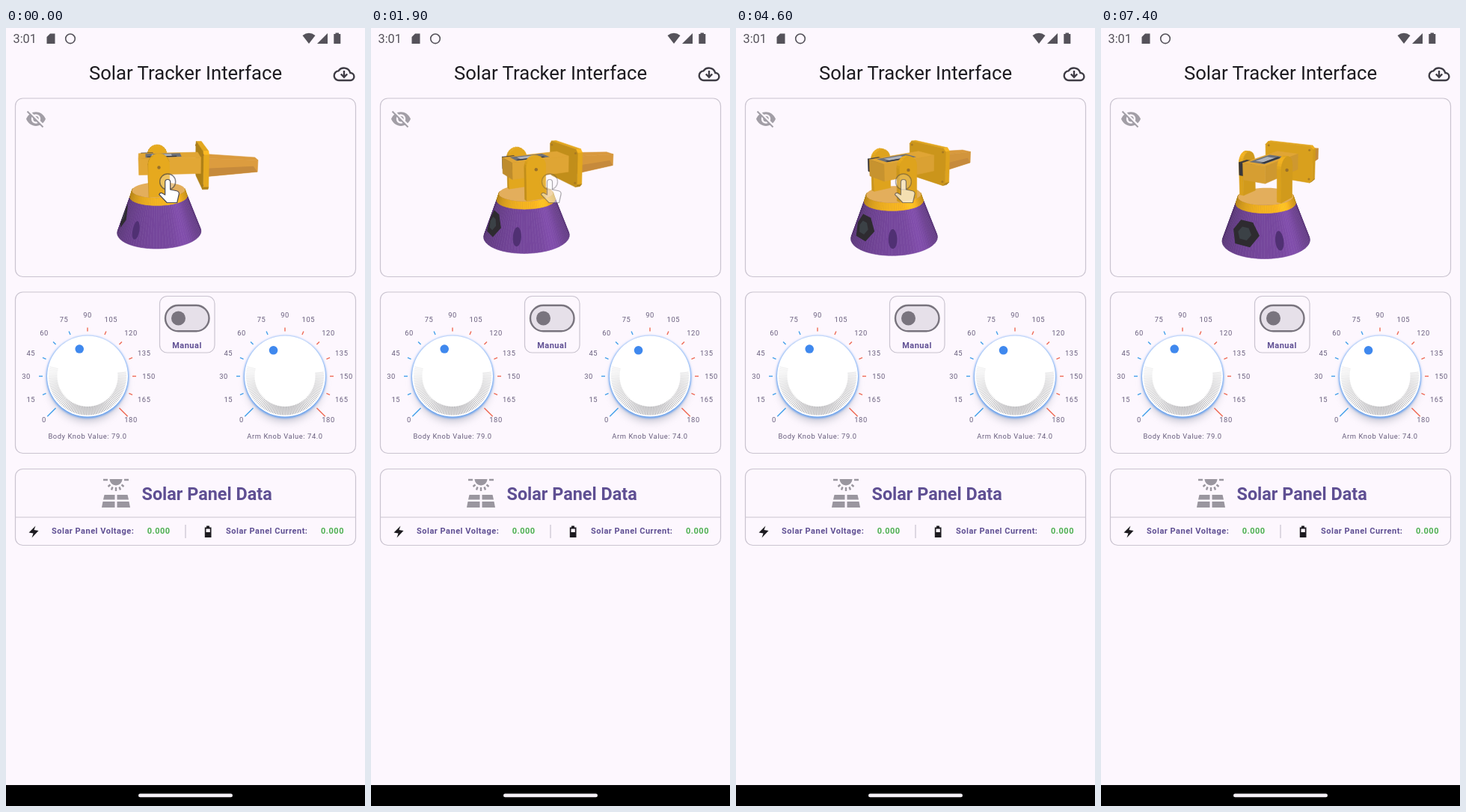
An HTML page with a canvas for the animation above (7500 ms loop, 480 px wide and 1040 px high).

```html
<!DOCTYPE html>
<html lang="en">
<head>
<meta charset="utf-8">
<title>Solar Tracker Interface</title>
<style>
html, body { margin: 0; width: 100%; height: 100%; overflow: hidden; background: #fdf7fe; }
svg, canvas { position: absolute; left: 0; top: 0; width: 480px; height: 1040px; display: block; }
text { font-family: Roboto, sans-serif; fill: #675d7c; }
.card { fill: none; stroke: #cac4d0; stroke-width: 1.2; }
.bold { font-weight: 700; fill: #5f4f93; }
.row { font-size: 11px; letter-spacing: .5px; }
.small { font-size: 9.4px; letter-spacing: .57px; }
.green { fill: #4caf50; }
.status { fill: #55525a; }
.title { fill: #1d1b20; }
</style>
</head>
<body>
<svg viewBox="0 0 480 1040">
  <defs>
    <filter id="rim" x="-30%" y="-30%" width="160%" height="160%"><feGaussianBlur stdDeviation="1.5"/></filter>
    <filter id="drop" x="-40%" y="-40%" width="180%" height="180%"><feGaussianBlur stdDeviation="6"/></filter>
  </defs>

  <g class="status">
    <text class="status" x="9.5" y="20" font-size="16.3">3:01</text>
    <path d="M59 7.500H65.500V21H54.500V12Z"/>
    <circle cx="86" cy="14.300" r="6.300" fill="none" stroke="#55525a" stroke-width="1.600"/>
    <path d="M405 21L396.500 10Q405 3.500 413.500 10Z"/>
    <path d="M430 7V21H416Z"/>
    <path d="M440.500 8V6.500H445V8H447.300V21H438.300V8Z"/>
  </g>

  <text class="title" x="240" y="69" font-size="25.700" text-anchor="middle">Solar Tracker Interface</text>
  <g fill="none" stroke="#3f3c45" stroke-width="2.400">
    <path d="M445.500 70A6.300 6.300 0 0 1 444.500 57.400A8.800 8.800 0 0 1 460.300 60A5 5 0 0 1 460.500 70Z"/>
    <path d="M452 57V65M447.800 61.500L452 65.800L456.200 61.500"/>
  </g>

  <rect class="card" x="12.500" y="94" width="455" height="238.500" rx="10"/>
  <rect class="card" x="12.500" y="353" width="455" height="215.500" rx="10"/>
  <rect class="card" x="12.500" y="589.500" width="455" height="102" rx="10"/>
  <path class="card" d="M12.500 654H467.500M240 664V682"/>

  <g fill="#a29ea6">
    <path fill-rule="evenodd" d="M27 121.500C32 109 48 109 53 121.500C48 134 32 134 27 121.500ZM33.800 121.500a6.200 6.200 0 0 0 12.400 0a6.200 6.200 0 0 0 -12.400 0Z"/>
    <circle cx="40" cy="121.500" r="3.700"/>
    <path d="M30 110.500L51.500 131.500" stroke="#fdf7fe" stroke-width="2.500"/>
    <path d="M28.500 111.500L49.500 132.500" stroke="#a29ea6" stroke-width="2"/>
  </g>

  <g id="knobs"></g>

  <rect x="205.500" y="358.500" width="73.500" height="75.500" rx="10" class="card"/>
  <rect x="213" y="370.700" width="58.500" height="34.600" rx="17.300" fill="#e6e0e9" stroke="#79747e" stroke-width="2.400"/>
  <circle cx="230.500" cy="388" r="9.500" fill="#79747e"/>
  <text class="bold" x="242" y="427.500" font-size="11" letter-spacing=".5" text-anchor="middle">Manual</text>

  <g fill="#9a969f" stroke="#9a969f">
    <path d="M138.500 603H155.500A8.500 8.500 0 0 1 138.500 603Z" stroke="none"/>
    <path d="M130 604H136M158 604H164M136.500 613L139.500 610.500M157.500 613L154.500 610.500M147 614V619M141 617.500L142.500 613.500M153 617.500L151.500 613.500" stroke-width="2.400"/>
    <path d="M131.500 624H145.500V630.500H130ZM148.500 624H162.500L164 630.500H148.500ZM129.500 633H145.500V641H128ZM148.500 633H164.500L166 641H148.500Z" stroke="none"/>
  </g>
  <text class="bold" x="181.500" y="630.500" font-size="23.400">Solar Panel Data</text>

  <path d="M39.500 665.500L30.500 674.500L36.500 675.500L34.500 681.500L43.500 672L37.500 671Z" fill="#1d1b20"/>
  <path fill-rule="evenodd" d="M268 667.500V665.500H272V667.500H274.500V681H265.800V667.500ZM267.500 669.500V674H272.800V669.500Z" fill="#1d1b20"/>
  <g class="row">
    <text class="bold" x="61" y="676">Solar Panel Voltage:</text>
    <text class="bold green" x="188.700" y="676">0.000</text>
    <text class="bold" x="294" y="676">Solar Panel Current:</text>
    <text class="bold green" x="421" y="676">0.000</text>
  </g>

  <rect y="1012" width="480" height="28" fill="#000"/>
  <rect x="177" y="1023.500" width="126" height="4.800" rx="2.400" fill="#f5f0f6"/>
</svg>
<canvas id="stage"></canvas>

<script>
const LOOP = 7500;
const RAD = Math.PI / 180;

// ---- knobs ----
function knob(cx, cy, value, label) {
  const at = (deg, r) => [cx + r * Math.sin(deg * RAD), cy - r * Math.cos(deg * RAD)];
  const line = (deg, r0, r1, attrs) => {
    const [x1, y1] = at(deg, r0), [x2, y2] = at(deg, r1);
    return `<line x1="${x1}" y1="${y1}" x2="${x2}" y2="${y2}" ${attrs}/>`;
  };
  let out = `<circle cx="${cx}" cy="${cy + 10}" r="50" fill="#868a9c" opacity=".5" filter="url(#drop)"/>
    <circle cx="${cx}" cy="${cy + 1}" r="55" fill="#5a9bf2" filter="url(#rim)"/>
    <circle cx="${cx}" cy="${cy}" r="54" fill="#fff"/>`;
  for (let deg = 84; deg <= 284; deg += 2.5) {
    const fade = 0.15 + 0.65 * Math.max(0, Math.sin((deg - 76) * 0.9 * RAD));
    out += line(deg, 40.5, 52, `stroke="#77747a" stroke-width=".9" opacity="${fade}"`);
  }
  for (let i = 0; i <= 12; i++) {
    const deg = -135 + 22.5 * i, long = i % 12 === 0;
    out += line(deg, 60, long ? 76 : 65, `stroke="${i < 6 ? '#42a0ea' : '#ee6a55'}" stroke-width="1.4"`);
    const [x, y] = at(deg, 82);
    out += `<text class="small" x="${x}" y="${y + 3.4}" text-anchor="middle">${i * 15}</text>`;
  }
  const [dx, dy] = at((value - 90) * 1.5, 38);
  return out + `<circle cx="${dx}" cy="${dy}" r="5.8" fill="#3f88ee"/>
    <text class="small" x="${cx}" y="549" text-anchor="middle">${label} Knob Value: ${value.toFixed(1)}</text>`;
}
document.getElementById('knobs').innerHTML = knob(109, 465.5, 79, 'Body') + knob(373, 465.5, 74, 'Arm');

// ---- motion: the hand sways every 5 s, the robot follows it while turning slowly ----
const SWAY = [[0, 0], [658, -1], [790, -1], [1842, 1], [1974, 1], [2632, 0], [5000, 0]];
const FADE = [[0, 0], [60, 0], [620, 1], [2400, 1], [2960, 0], [5000, 0]];
const PHASE = 787, LAG = 110;
const ease = k => k < 0.5 ? 2 * k * k : 1 - 2 * (1 - k) * (1 - k);

function track(keys, time) {
  const t = time % 5000;
  const i = keys.findIndex(k => k[0] > t);
  const [t0, a] = keys[i - 1], [t1, b] = keys[i];
  return a + (b - a) * ease((t - t0) / (t1 - t0));
}

// ---- small 3D view: points are [along arm, up, sideways] ----
const canvas = document.getElementById('stage');
const ratio = window.devicePixelRatio || 1;
canvas.width = 480 * ratio;
canvas.height = 1040 * ratio;
const ctx = canvas.getContext('2d');
const DIST = 550, SIN_E = Math.sin(17 * RAD), COS_E = Math.cos(17 * RAD);
const YELLOW = [242, 178, 32], ORANGE = [232, 164, 66], PURPLE = [116, 70, 154];
const AXIS = -36;
const CONE = { low: -61, high: -11, wide: 57, narrow: 38 };
let turn = 0;

function view([u, v, w]) {
  const c = Math.cos(turn), s = Math.sin(turn);
  const z = w * c - u * s;
  return [u * c + w * s, v * COS_E - z * SIN_E, v * SIN_E + z * COS_E];
}
function screen(p) {
  const [x, y, z] = view(p), k = DIST / (DIST - z);
  return [240 + x * k, 213 - y * k];
}
function poly(points, fill, seam) {
  ctx.beginPath();
  points.forEach(p => ctx.lineTo(...screen(p)));
  ctx.closePath();
  ctx.fillStyle = fill;
  ctx.fill();
  if (seam) {
    ctx.strokeStyle = fill;
    ctx.lineWidth = 0.6;
    ctx.stroke();
  }
}
const tint = (rgb, k) => `rgb(${rgb.map(c => Math.min(255, Math.round(c * k)))})`;
const sub = (a, b) => a.map((n, i) => n - b[i]);
const dot = (a, b) => a[0] * b[0] + a[1] * b[1] + a[2] * b[2];
const cross = (a, b) => [a[1] * b[2] - a[2] * b[1], a[2] * b[0] - a[0] * b[2], a[0] * b[1] - a[1] * b[0]];
const mean = ps => [0, 1, 2].map(i => ps.reduce((sum, p) => sum + p[i], 0) / ps.length);

// Convex body between two rings of equal length; hidden faces are skipped.
function solid(a, b, rgb) {
  const mid = view(mean([...a, ...b]));
  const sides = a.map((p, i) => {
    const j = (i + 1) % a.length;
    return [p, a[j], b[j], b[i]];
  });
  for (const face of [...sides, a, b]) {
    const [p, q, r] = face.map(view);
    let n = cross(sub(q, p), sub(r, p));
    if (dot(n, sub(p, mid)) < 0) n = n.map(c => -c);
    if (dot(n, sub([0, 0, DIST], p)) <= 0) continue;
    const light = dot(n, [0.1, 0.45, 0.88]) / Math.hypot(...n);
    poly(face, tint(rgb, 0.72 + 0.32 * Math.max(0, light)), true);
  }
}
const box = (u0, u1, v0, v1, w0, w1, rgb) => {
  const ring = u => [[u, v0, w0], [u, v1, w0], [u, v1, w1], [u, v0, w1]];
  solid(ring(u0), ring(u1), rgb);
};

const round = (r, deg, v) => [AXIS + r * Math.sin(deg * RAD), v, r * Math.cos(deg * RAD)];
function drum(v0, v1, r0, r1, rgb, top) {
  const shift = turn / RAD;
  for (let a = -100; a < 100; a += 4) {
    const k = 0.76 + 0.26 * Math.cos((a - 12) * RAD) + 0.12 * Math.exp(-(((a - 38) / 14) ** 2));
    const d = a - shift;
    poly([round(r0, d, v0), round(r0, d + 4, v0), round(r1, d + 4, v1), round(r1, d, v1)], tint(rgb, k), true);
  }
  const cap = [];
  for (let a = 0; a < 360; a += 8) cap.push(round(r1, a, v1));
  poly(cap, top);
}
// Patch on the purple cone: centre angle, height share, half sizes.
function patch(deg, height, spread, rise, count, fill) {
  const shift = turn / RAD, pts = [];
  for (let i = 0; i < count; i++) {
    const a = i / count * 2 * Math.PI;
    const h = height + rise * Math.sin(a);
    const d = Math.max(-89, deg + spread * Math.cos(a) + shift) - shift;
    const r = CONE.wide + (CONE.narrow - CONE.wide) * h;
    pts.push(round(r, d, CONE.low + (CONE.high - CONE.low) * h));
  }
  poly(pts, fill);
}
function upright(w0, w1) {
  const ring = w => {
    const pts = [[AXIS - 13, -2, w]];
    for (let a = 180; a >= 0; a -= 15) pts.push([AXIS + 13 * Math.cos(a * RAD), 39.5 + 13 * Math.sin(a * RAD), w]);
    pts.push([AXIS + 13, -2, w]);
    return pts;
  };
  solid(ring(w0), ring(w1), YELLOW);
}
function disc(p, r, fill) {
  ctx.beginPath();
  ctx.arc(...screen(p), r, 0, 7);
  ctx.fillStyle = fill;
  ctx.fill();
}

function robot() {
  drum(CONE.low, CONE.high, CONE.wide, CONE.narrow, PURPLE, '#6a3f86');
  patch(-90, 0.5, 24, 0.32, 6, '#2e2b30');
  patch(-90, 0.5, 12, 0.16, 6, '#3b4146');
  patch(-38, 0.37, 6, 0.22, 18, '#503073');
  drum(CONE.high, -2, CONE.narrow, 35, YELLOW, '#e3ae5c');
  upright(-31, -25);

  const beam = (u, v0, v1, w) => [[u, v0, -w], [u, v1, -w], [u, v1, w], [u, v0, w]];
  solid(beam(25, 18, 42, 14), beam(95, 21, 37, 8), ORANGE);
  poly([[25, 18, 14], [25, 29, 14], [89, 29, 8.5], [95, 21, 8]], '#c68a3c');

  const plate = u => [[-35, 9], [-35, 52], [-31, 56], [34, 56], [38, 52], [38, 11], [34, 7], [-31, 7]].map(([w, v]) => [u, v, w]);
  solid(plate(18), plate(25), YELLOW);
  for (const w of [-30, 33]) for (const v of [12, 51]) disc([18, v, w], 1.5, '#a87a22');

  box(-58, -42, 27, 43, -24, -16, [62, 60, 66]);
  box(-61, 18, 23, 44, -16, 16, [238, 176, 56]);
  poly([[-52, 44, -13], [-6, 44, -13], [-6, 44, 9], [-52, 44, 9]], '#6c7078');
  poly([[-44, 44, -9], [-18, 44, -9], [-18, 44, 3], [-44, 44, 3]], '#aeb2ba');
  poly([[-50, 44, 3], [-12, 44, 3], [-12, 44, 8], [-50, 44, 8]], '#34363e');
  upright(25, 31);
  disc([AXIS, 36, 31], 2.2, '#98702a');
}

const HAND = new Path2D('M-3.500 206a3.500 3.500 0 0 1 7 0V216L11 217.500Q16 218.500 15 222.500L12.500 233.500H-1L-11.500 222.500Q-10 219.500 -7 221L-3.500 223Z');
function pointer(x, alpha) {
  if (alpha <= 0) return;
  ctx.save();
  ctx.globalAlpha = alpha;
  ctx.translate(x, 0);
  ctx.beginPath();
  ctx.arc(0, 205.5, 10.5, 0, 7);
  ctx.fillStyle = 'rgba(255,255,255,.3)';
  ctx.fill();
  ctx.strokeStyle = 'rgba(60,58,62,.65)';
  ctx.lineWidth = 1.4;
  ctx.stroke();
  ctx.fillStyle = '#fff';
  ctx.fill(HAND);
  ctx.strokeStyle = '#4c494f';
  ctx.lineWidth = 1.2;
  ctx.lineJoin = 'round';
  ctx.stroke(HAND);
  ctx.restore();
}

function draw(t) {
  const phase = t + PHASE;
  turn = (17 + 5.625 * t / 1000 + 11.25 * track(SWAY, phase - LAG)) * RAD;
  ctx.setTransform(ratio, 0, 0, ratio, 0, 0);
  ctx.clearRect(0, 0, 480, 1040);
  robot();
  pointer(239 + 22.8 * track(SWAY, phase), track(FADE, phase));
}

const start = performance.now();
function tick() {
  const t = (performance.now() - start) % LOOP;
  draw(Math.floor(t / 100) * 100);
  requestAnimationFrame(tick);
}
tick();
</script>
</body>
</html>
```
